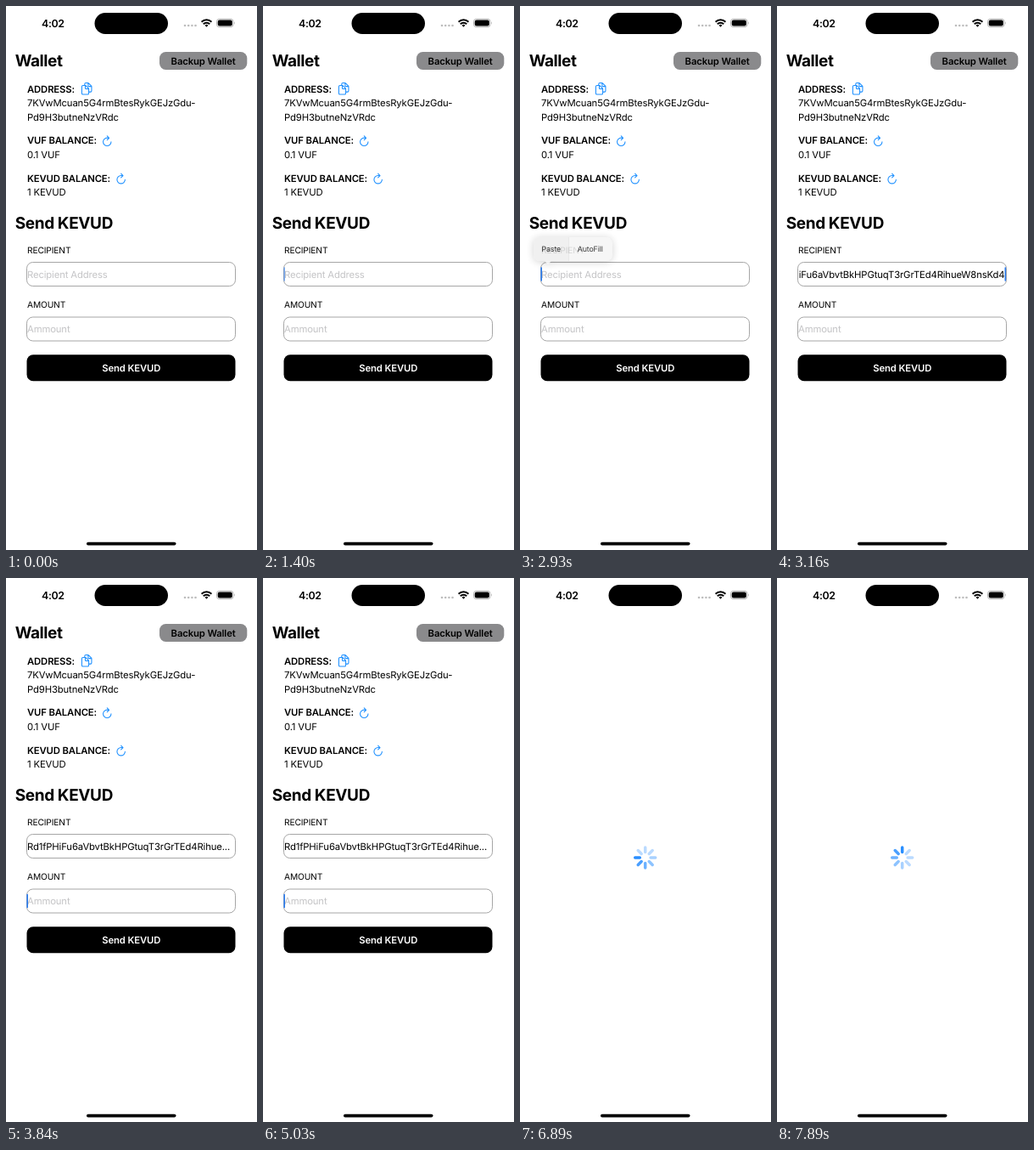
These frames come from a looping animation (296 by 640 pixels, 7990 ms). An HTML page:

```html
<!DOCTYPE html>
<html lang="en">
<head>
<meta charset="utf-8">
<title>Wallet</title>
<style>
  html, body { margin: 0; width: 100%; height: 100%; overflow: hidden; background: #fff; }
  svg { display: block; }
  text {
    font: 11.3px Inter, "Noto Sans", sans-serif;
    letter-spacing: -.012em;
    text-rendering: geometricPrecision;
    white-space: pre;
  }
  .title { font-size: 19px; font-weight: 700; letter-spacing: -.02em; }
  .bold { font-weight: 600; }
  .label { font-size: 10.2px; }
  .hint { fill: #c4c4c6; }
  .mid { text-anchor: middle; }
  .clock { font-size: 12.4px; font-weight: 600; letter-spacing: -.03em; }
  .field { fill: #fff; stroke: #a6a6a6; }
  .caret { fill: #2b7cf0; }
  .icon { fill: none; stroke: #1e90ff; stroke-width: 36; stroke-linecap: round; stroke-linejoin: round; }
  #menu { filter: drop-shadow(0 1px 5px rgba(0, 0, 0, .2)); }
  #menu text { font-size: 8.8px; fill: #222; }
</style>
</head>
<body>
<svg width="296" height="640" viewBox="0 0 296 640">
  <defs>
    <clipPath id="inside"><rect x="25" y="302" width="245" height="27"/></clipPath>
    <g id="refresh" class="icon">
      <path d="M320 146s24-12-64-12a160 160 0 1 0 160 160M256 58l80 80-80 80"/>
    </g>
  </defs>

  <text class="clock" x="42" y="24.500">4:02</text>
  <rect x="104.500" y="8" width="86.500" height="25" rx="12.500"/>
  <g fill="#bdbdbd">
    <circle cx="211" cy="23" r="1.300"/><circle cx="215.200" cy="23" r="1.300"/>
    <circle cx="219.400" cy="23" r="1.300"/><circle cx="223.500" cy="23" r="1.300"/>
  </g>
  <g fill="none" stroke="#000" stroke-width="2">
    <path d="M230.600 18.800a8.300 8.300 0 0 1 11.800 0M232.800 21.200a5.200 5.200 0 0 1 7.400 0"/>
    <path d="M236.500 24.800l-1.900-2a2.700 2.700 0 0 1 3.800 0z" fill="#000" stroke="none"/>
  </g>
  <rect x="248.500" y="15.300" width="19.500" height="9.400" rx="3" fill="none" stroke="#aaa" stroke-width=".9"/>
  <rect x="249.700" y="16.500" width="17.100" height="7" rx="2"/>
  <path d="M269 18.300q1.500 1.700 0 3.400z" fill="#aaa"/>
  <rect x="95" y="630.700" width="105.500" height="3.800" rx="1.900"/>

  <g id="form">
    <text class="title" x="10.700" y="71">Wallet</text>
    <rect x="181" y="54" width="103.300" height="21" rx="7.500" fill="#8a8a8c"/>
    <text class="bold mid" x="232.600" y="68.600">Backup Wallet</text>

    <text class="bold" x="25" y="101.600">ADDRESS:</text>
    <g class="icon" transform="translate(87.500 89.600) scale(.03)">
      <path d="M336 264V436a43 44 0 0 1-43 44H107a43 44 0 0 1-43-44V172a44 44 0 0 1 44-44h94a25 25 0 0 1 17.500 7.400l109 111a25 25 0 0 1 7.500 17.600z"/>
      <path d="M200 128v109c0 15 11 27 25 27h111"/>
      <path d="M176 128V76a43 44 0 0 1 43-44h95a25 25 0 0 1 17.500 7.400l109 111a25 25 0 0 1 7.500 17.600V340a43 44 0 0 1-43 44h-56M312 32v109c0 15 11 27 25 27h111"/>
    </g>
    <text x="25" y="118.300">7KVwMcuan5G4rmBtesRykGEJzGdu-</text>
    <text x="25" y="135">Pd9H3butneNzVRdc</text>

    <text class="bold" x="25" y="162.300">VUF BALANCE:</text>
    <use href="#refresh" transform="translate(111.700 151.200) scale(.0295)"/>
    <text x="25" y="179">0.1 VUF</text>

    <text class="bold" x="25" y="206.600">KEVUD BALANCE:</text>
    <use href="#refresh" transform="translate(128.100 195.500) scale(.0295)"/>
    <text x="25" y="223.200">1 KEVUD</text>

    <text class="title" x="10.700" y="262">Send KEVUD</text>
    <text class="label" x="25" y="290.600">RECIPIENT</text>
    <rect class="field" x="24.500" y="301.500" width="246" height="28" rx="7.200"/>
    <g clip-path="url(#inside)"><text id="recipient" y="319.600"></text></g>
    <rect id="caret1" class="caret" y="307.300" width="1.600" height="16.500" rx=".7"/>

    <text class="label" x="25" y="355.200">AMOUNT</text>
    <rect class="field" x="24.500" y="366" width="246" height="28" rx="7.200"/>
    <text id="amount" x="25" y="384.200"></text>
    <rect id="caret2" class="caret" y="371.800" width="1.600" height="16.500" rx=".7"/>

    <rect x="24.500" y="410.200" width="246" height="31" rx="7.500"/>
    <text class="bold mid" x="147.700" y="429.700" fill="#fff">Send KEVUD</text>

    <g id="menu">
      <path fill="#f5f5f5" d="M23 272H102a7 7 0 0 1 7 7V293a7 7 0 0 1-7 7H37l-4 4-4-4H23a7 7 0 0 1-7-7V279a7 7 0 0 1 7-7z"/>
      <path id="press" fill="#eee" d="M23 272H57.500V300H23a7 7 0 0 1-7-7V279a7 7 0 0 1 7-7z"/>
      <path d="M57.500 272V300" stroke="#e0e0e0" stroke-width=".7"/>
      <text x="25.500" y="289">Paste</text>
      <text x="67.700" y="289">AutoFill</text>
    </g>
  </g>
  <g id="spinner" stroke="#1e88ff" stroke-width="3.500" stroke-linecap="round"></g>
</svg>
<script>
  const LOOP = 7990;
  const KEY = "Rd1fPHiFu6aVbvtBkHPGtuqT3rGrTEd4Rihue";
  const TAIL = "W8nsKd4";
  const $ = id => document.getElementById(id);

  // Each track is a list of [start, value]; a value holds until the next start.
  const MENU = [[0, [0, 1]], [2260, [.75, .92]], [2360, [.93, .98]], [2470, [.97, 1]],
                [2930, [.88, 1]], [3040, [.3, 1]], [3160, [0, 1]]];
  const RECIPIENT = [[0, "hint"], [3040, "tail"], [3730, "cut"]];
  const CARET1 = [[0, 0], [1400, .6], [1510, 1], [3730, 0]];
  const CARET2 = [[0, 0], [3840, 1], [4500, 0], [4830, .65], [5030, 1]];
  const AMOUNT = [[0, ""], [5270, "0"], [5410, "0."], [5750, "0.2"]];
  const SPIN = [6890, 7030, 7130, 7230, 7330, 7430, 7530, 7640, 7740, 7890].map(t => [t, t]);
  const FADE = [.95, .8, .65, .5, .38, .3, .3, .3];

  const at = (track, t) => track.reduce((value, [start, next]) => t >= start ? next : value, track[0][1]);
  const set = (el, attrs) => { for (const name in attrs) el.setAttribute(name, attrs[name]); };

  function write(el, text, hint) {
    el.textContent = text || hint;
    el.classList.toggle("hint", !text);
    return text ? el.getComputedTextLength() : 0;
  }

  const petals = FADE.map((_, i) => {
    const petal = document.createElementNS("http://www.w3.org/2000/svg", "path");
    set(petal, { d: "M0-6.400V-12", transform: `translate(147.700 329) rotate(${i * 45})` });
    return $("spinner").appendChild(petal);
  });

  function drawForm(t) {
    const mode = at(RECIPIENT, t);
    const value = { hint: "", tail: KEY + TAIL, cut: KEY + "..." }[mode];
    const width = write($("recipient"), value, "Recipient Address");
    set($("recipient"), { x: mode === "tail" ? 268.5 - width : 25 });
    set($("caret1"), { x: mode === "tail" ? 268.5 : 24.4, opacity: at(CARET1, t) });

    const end = write($("amount"), at(AMOUNT, t), "Ammount");
    set($("caret2"), { x: 24.4 + end, opacity: at(CARET2, t) });

    const [opacity, scale] = at(MENU, t);
    set($("menu"), { opacity, transform: `translate(33 304) scale(${scale}) translate(-33 -304)` });
    set($("press"), { opacity: t >= 2710 ? 1 : 0 });
  }

  function drawSpinner(t) {
    const head = 6 + Math.floor((at(SPIN, t) - SPIN[0][0]) / 100);
    petals.forEach((petal, i) => set(petal, { opacity: FADE[(head - i + 8) % 8] }));
  }

  function draw() {
    const t = performance.now() % LOOP;
    const busy = t >= SPIN[0][0];
    $("form").style.display = busy ? "none" : "";
    $("spinner").style.display = busy ? "" : "none";
    busy ? drawSpinner(t) : drawForm(t);
    requestAnimationFrame(draw);
  }
  draw();
</script>
</body>
</html>
```
